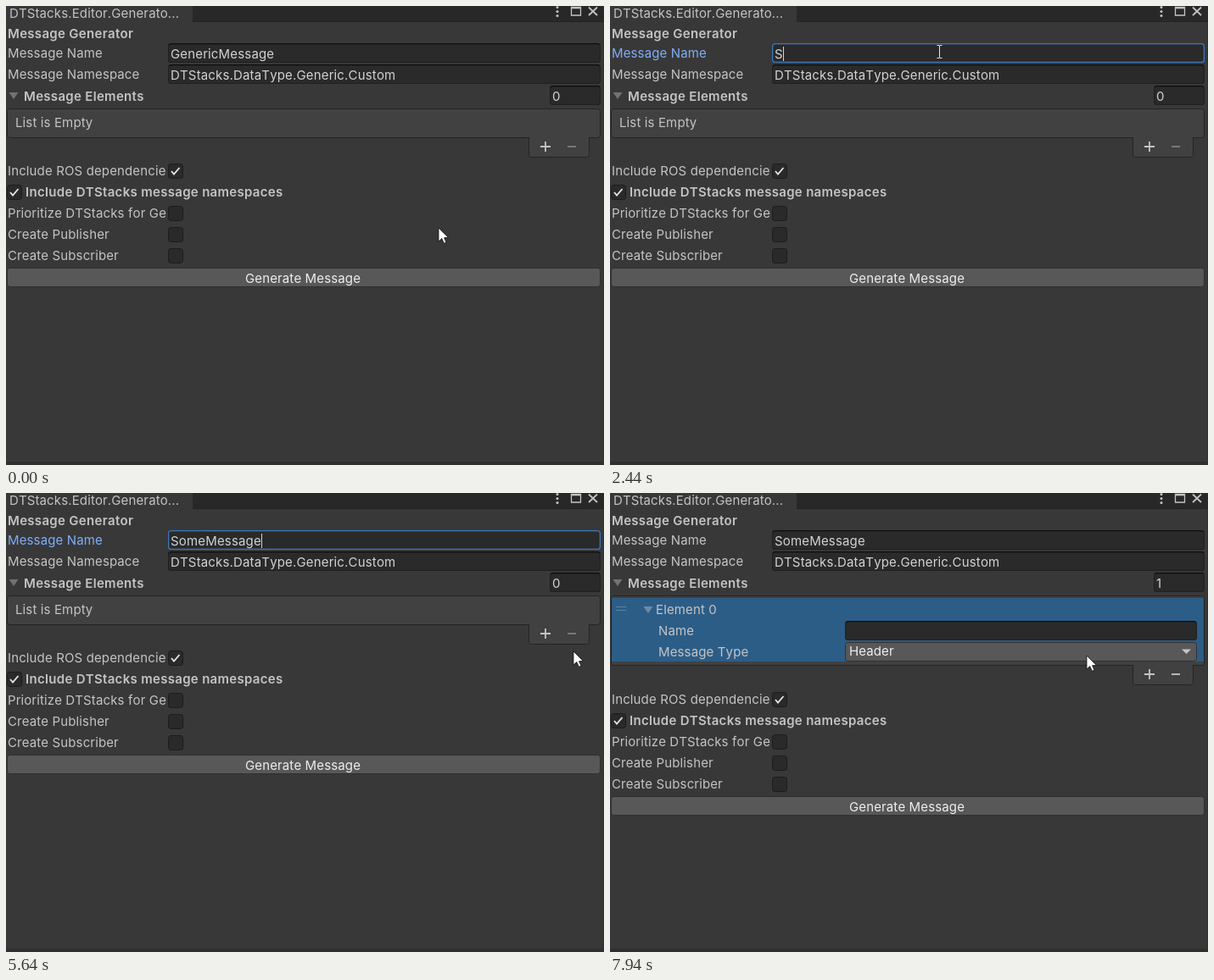
An HTML page for the animation above (8000 ms loop, 705x542 px).

```html
<!DOCTYPE html>
<html lang="en">
<head>
<meta charset="utf-8">
<title>Message Generator</title>
<style>
  html, body { margin: 0; width: 100%; height: 100%; overflow: hidden; background: #383838; }
  svg { display: block; width: 705px; height: 542px; }
  text { font: 15px Inter, sans-serif; font-kerning: none; letter-spacing: .13px; fill: #c4c4c4; white-space: pre; }
  .bold { font-weight: 600; letter-spacing: .31px; }
  .value { fill: #d2d2d2; letter-spacing: .17px; }
  .button { fill: #eee; }
  .line { fill: none; stroke: #c4c4c4; stroke-width: 1.8; }
</style>
</head>
<body>
<svg id="stage" viewBox="0 0 705 542" xmlns="http://www.w3.org/2000/svg"></svg>
<script>
const LOOP = 8000;
const EDGE = 'url(#edge)';

// Markup helpers
const label = (x, y, s, cls = '', id = '') => `<text x="${x}" y="${y}" class="${cls}" id="${id}">${s}</text>`;
const box = (x, y, w, h, fill, stroke, id = '', line = 1) =>
  `<rect x="${x + line / 2}" y="${y + line / 2}" width="${w - line}" height="${h - line}" rx="3" fill="${fill}" stroke="${stroke}" stroke-width="${line}" id="${id}"/>`;
const bar = (x, y, w, h, fill, id = '') => `<rect x="${x}" y="${y}" width="${w}" height="${h}" fill="${fill}" id="${id}"/>`;
const path = (d, attrs) => `<path d="${d}" ${attrs}/>`;
const field = (x, y, w, id) => box(x, y, w, 23, '#2a2a2a', EDGE, id, 1.25);
const foldout = (x, y, fill) => path(`M${x} ${y}h11l-5.5 8z`, `fill="${fill}"`);
const toggle = (x, y, on) => box(x, y, 18, 18, '#2a2a2a', '#1c1c1c') +
  (on ? path(`M${x + 4} ${y + 9}l3 3.5l6.5 -7.5`, 'class="line" style="stroke:#e6e6e6"') : '');

document.getElementById('stage').innerHTML = `
  <linearGradient id="edge" x2="0" y2="1">
    <stop offset=".06" stop-color="#0d0d0d"/><stop offset=".06" stop-color="#212121"/>
  </linearGradient>
  ${bar(0, 0, 705, 542, '#383838')}
  ${bar(220, 0, 485, 18, '#282828')}${bar(220, 18, 485, 1, '#232323')}
  ${bar(0, 538, 705, 4, '#303030')}${bar(704, 19, 1, 523, '#303030')}
  ${label(4, 14, 'DTStacks.Editor.Generato...')}
  ${[1.5, 6.5, 11.5].map(y => `<circle cx="650" cy="${y}" r="1.5" fill="#c4c4c4"/>`).join('')}
  ${path('M666.5 1.5h11v9.5h-11zM666 2.5h12', 'class="line" style="stroke-width:1.3"')}
  ${path('M687 1.5l10 9.5m0 -9.5l-10 9.5', 'class="line"')}

  ${label(2, 38, 'Message Generator', 'bold')}
  ${label(2, 61, 'Message Name', '', 'nameLabel')}
  ${field(191, 44, 510, 'nameField')}
  ${bar(194, 47, 0, 19, '#3662a0', 'selection')}
  ${label(194, 62, '', 'value', 'nameText')}
  ${bar(0, 48, 1, 17, '#d2d2d2', 'caret')}
  ${label(2, 86, 'Message Namespace')}
  ${field(191, 69, 510, 'spaceField')}
  ${label(194, 87, 'DTStacks.DataType.Generic.Custom', 'value')}
  ${foldout(3.5, 102, '#727272')}
  ${label(21, 112, 'Message Elements', 'bold')}
  ${field(641, 94, 60, 'countField')}
  ${label(644, 112, '0', 'value', 'count')}

  <g id="empty">
    ${box(1, 121, 700, 35, '#414141', '#242424')}
    ${label(11, 143, 'List is Empty')}
  </g>
  <g id="element">
    ${box(1, 121, 700, 83, '#414141', '#242424')}
    ${bar(2, 124, 698, 75, '#2c5d87')}
    ${path('M7 134.5h12m-12 4h12', 'stroke="#62809a" fill="none"')}
    ${foldout(39.5, 134, '#6d8ba5')}
    ${label(54, 143, 'Element 0')}
    ${label(57, 168, 'Name')}
    ${field(277, 151, 415, 'itemField')}
    ${label(57, 193, 'Message Type')}
    ${box(277, 176, 415, 23, '#515151', '#303030', 'dropdown')}
    ${label(282, 192, 'Header', 'button')}
    ${path('M674 184.5h11l-5.5 5.5z', 'fill="#c4c4c4"')}
  </g>
  <g id="footer">
    ${bar(617, 154, 70, 3, '#414141')}
    ${path('M616.5 155V175.5q0 3 3 3H684.5q3 0 3 -3V155', 'fill="#414141" stroke="#242424"')}
    ${path('M630 166h12m-6 -6v12', 'class="line"')}
    ${path('M662 166h10', 'class="line" id="minus"')}
  </g>
  <g id="options">
    ${label(2, 200, 'Include ROS dependencie')}${toggle(191, 186, true)}
    ${toggle(1, 211, true)}${label(23, 225, 'Include DTStacks message namespaces', 'bold')}
    ${label(2, 250, 'Prioritize DTStacks for Ge')}${toggle(191, 236, false)}
    ${label(2, 275, 'Create Publisher')}${toggle(191, 261, false)}
    ${label(2, 300, 'Create Subscriber')}${toggle(191, 286, false)}
    ${box(1, 309, 700, 23, '#585858', '#303030')}
    <text x="350" y="327" text-anchor="middle" class="button">Generate Message</text>
  </g>

  <g id="pointer">${path('M0 0V16L3.8 12.6L6.4 18.3L9 17.2L6.6 11.6H11.5Z', 'fill="#fff" stroke="#111" stroke-width=".8"')}</g>
  <g id="beam">${path('M-3 -7.5h2.5l.5 .5l.5 -.5h2.5M0 -7V7M-3 7.5h2.5l.5 -.5l.5 .5h2.5', 'fill="none" stroke="#e8e8e8"')}</g>
  <circle id="click" r="15" fill="#ff0" opacity=".5"/>`;

const ui = {};
document.querySelectorAll('[id]').forEach(el => { if (el.id) ui[el.id] = el; });

// Pointer moves: first step, last step, step count, destination
const START = [510, 262];
const MOVES = [
  [70, 840, 12, 388.5, 54.5],
  [5170, 5640, 8, 669, 187],
  [5980, 6390, 7, 647, 167],
  [6530, 6590, 2, 643, 167],
  [7390, 7940, 9, 562, 192]
];
const TYPED = 'SomeMessage';
const KEYS = [2440, 2710, 2840, 2910, 3440, 3640, 3910, 4110, 4170, 4370, 4440];
const FOCUS = 1570, SELECT = 1780, PRESS = 6860, ADD = 7060;

const ease = u => u * u * (3 - 2 * u);
const show = (el, on) => el.setAttribute('visibility', on ? 'visible' : 'hidden');
const place = (el, x, y) => el.setAttribute('transform', `translate(${x} ${y})`);

function pointerAt(t) {
  let [x, y] = START;
  for (const [from, to, steps, nx, ny] of MOVES) {
    if (t < from) break;
    const step = Math.floor((t - from) / (to - from) * (steps - 1) + 1e-6) + 1;
    const u = ease(Math.min(1, step / steps));
    x += (nx - x) * u;
    y += (ny - y) * u;
  }
  return [x, y];
}

function render(t) {
  const [x, y] = pointerAt(t);
  const added = t >= ADD;
  const focused = t >= FOCUS && !added;
  const selected = t >= SELECT && t < KEYS[0];
  const over = (x0, y0, w) => x >= x0 && x < x0 + w && y >= y0 && y < y0 + 23;

  const hover = {
    nameField: over(191, 44, 510),
    spaceField: over(191, 69, 510),
    countField: over(641, 94, 60),
    itemField: added && over(277, 151, 415)
  };
  for (const id in hover) ui[id].setAttribute('stroke', hover[id] ? '#656565' : EDGE);
  if (focused) ui.nameField.setAttribute('stroke', '#3a79bb');
  ui.nameLabel.style.fill = focused ? '#7eaef8' : '';

  const typed = KEYS.filter(k => t >= k).length;
  ui.nameText.textContent = typed ? TYPED.slice(0, typed) : 'GenericMessage';
  const width = ui.nameText.getComputedTextLength();
  ui.selection.setAttribute('width', selected ? width : 0);
  ui.caret.setAttribute('x', Math.round(194 + width));
  show(ui.caret, focused);

  ui.count.textContent = added ? '1' : '0';
  show(ui.empty, !added);
  show(ui.element, added);
  place(ui.footer, 0, added ? 48 : 0);
  place(ui.options, 0, added ? 49 : 0);
  ui.minus.style.stroke = added ? '' : '#7e7e7e';
  ui.dropdown.setAttribute('fill', added && over(277, 176, 415) ? '#585858' : '#515151');

  const editing = Object.values(hover).some(Boolean);
  show(ui.pointer, !editing);
  show(ui.beam, editing);
  place(ui.pointer, Math.round(x), Math.round(y));
  place(ui.beam, Math.floor(x) + .5, Math.floor(y));
  show(ui.click, (t >= FOCUS && t < SELECT) || (t >= PRESS && t < ADD));
  place(ui.click, Math.floor(x) - 1, Math.round(y) - 1);
}

function tick() {
  render(performance.now() % LOOP);
  requestAnimationFrame(tick);
}
tick();
</script>
</body>
</html>
```
